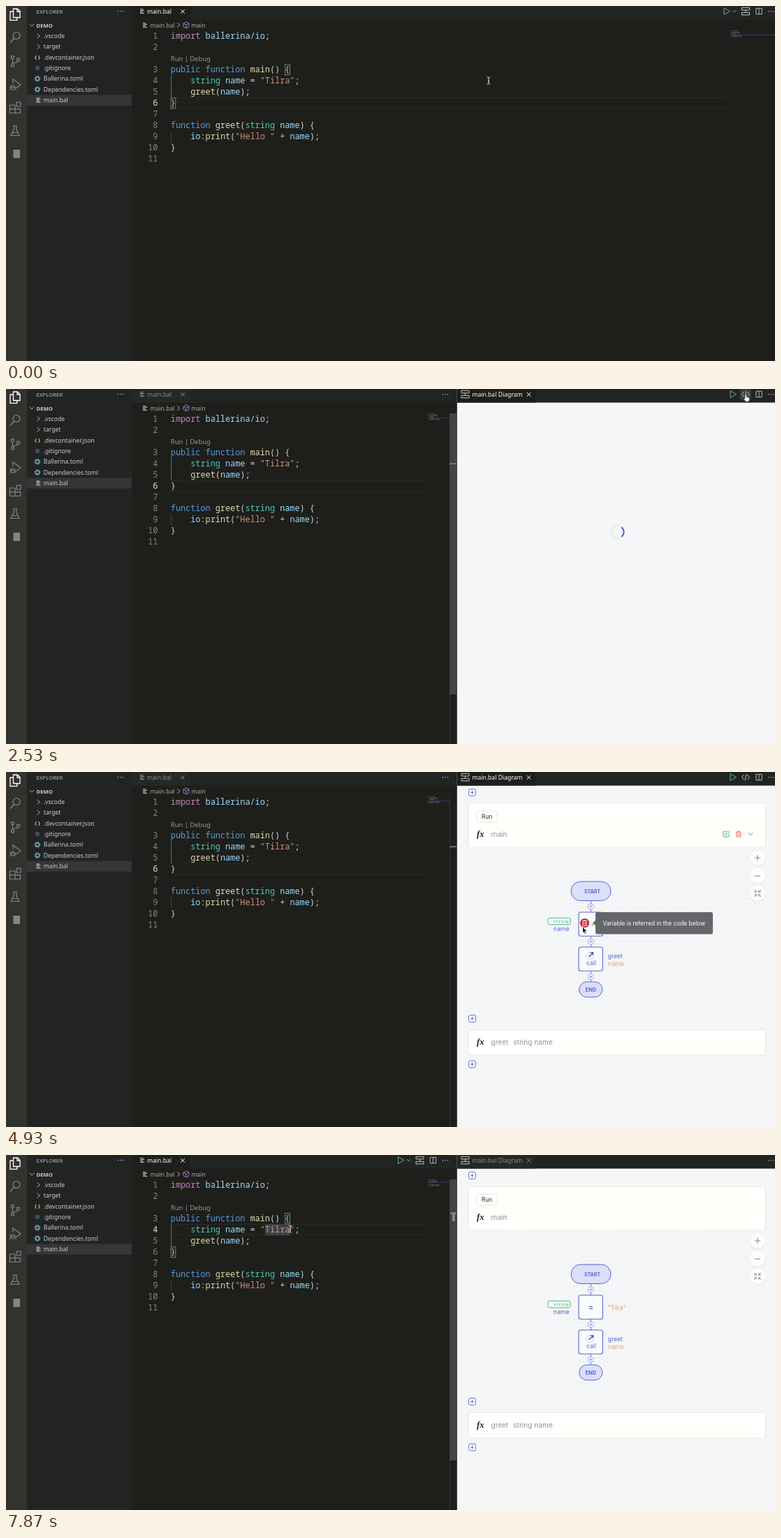
An HTML page that plays this animation: 1101 by 509 pixels, repeating every 8 s.

```html
<!DOCTYPE html>
<html lang="en">
<head>
<meta charset="utf-8">
<title>Editor and diagram</title>
<style>
html, body { margin: 0; width: 100%; height: 100%; overflow: hidden; background: #1e1e1b; }
svg { display: block; width: 100vw; height: 100vh; }
text { white-space: pre; font-family: "Noto Sans", "Open Sans", sans-serif; }
.mono { font-family: "Noto Sans Mono", "DejaVu Sans Mono", monospace; }
.geo { font-family: Inter, Roboto, sans-serif; }
.fx { font-family: "Liberation Serif", "Noto Serif", serif; font-style: italic; font-weight: bold; }
.bold { font-weight: 700; }
.end { text-anchor: end; }
.mid { text-anchor: middle; }
</style>
</head>
<body>
<svg id="stage" viewBox="0 0 1101 509" preserveAspectRatio="none"></svg>
<script>
const LOOP = 8000, STEP = 200 / 3;
const CHAR = 7.113, ROW = 16.05, LEFT = 235.8;
const BLUE = '#5567d5', GREY = '#c5c5c5', ORANGE = '#e2a468';

// Markup helpers
const rect = (x, y, w, h, fill, extra = '') =>
  `<rect x="${x}" y="${y}" width="${w}" height="${h}" fill="${fill}" ${extra}/>`;
const box = (x, y, w, h, r, fill, stroke, width = 1) =>
  rect(x, y, w, h, fill, `rx="${r}" stroke="${stroke}" stroke-width="${width}"`);
const circle = (x, y, r, fill, stroke = 'none', width = 1) =>
  `<circle cx="${x}" cy="${y}" r="${r}" fill="${fill}" stroke="${stroke}" stroke-width="${width}"/>`;
const line = (d, stroke, width = 1, fill = 'none') =>
  `<path d="${d}" fill="${fill}" stroke="${stroke}" stroke-width="${width}"/>`;
const text = (x, y, size, fill, str, cls = '') =>
  `<text x="${x}" y="${y}" font-size="${size}" fill="${fill}" class="${cls}">${str}</text>`;
const group = (id, ...parts) => `<g id="${id}">${parts.join('')}</g>`;
const at = (x, y, ...parts) => `<g transform="translate(${x} ${y})">${parts.join('')}</g>`;

// Small icons, centred on the given point
const play = x => at(x, 7.5, line('M-4-4.8L4.5 0L-4 4.8Z', '#5fb878', 1));
const chevronDown = (x, y, s = 2.3, c = GREY) => at(x, y, line(`M${-s} ${-s / 2}L0 ${s / 2}L${s} ${-s / 2}`, c, .9));
const chevronRight = (x, y) => at(x, y, line('M-1.8-3.3L1.8 0L-1.8 3.3', GREY, .9));
const diagram = x => at(x, 7.3, line('M-5.5-5H5.5V-1.5H-5.5ZM-5.5 2H5.5V5.5H-5.5ZM0-1.5V2', GREY, 1));
const codeIcon = x => at(x, 7.5, line('M-2.5-3.5L-5.5 0L-2.5 3.5M2.5-3.5L5.5 0L2.5 3.5M1-4.5L-1 4.5', GREY, 1));
const splitIcon = x => at(x, 7.5, line('M-4.2-4.2H4.2V4.2H-4.2ZM0-4.2V4.2', GREY, .9));
const dots = (x, y = 7.8) => [-3.5, 0, 3.5].map(d => circle(x + d, y, .75, GREY)).join('');
const close = (x, c) => at(x, 7.8, line('M-2.8-2.8L2.8 2.8M2.8-2.8L-2.8 2.8', c, 1));
const fileIcon = (x, y, c) => at(x, y, line('M-3-2.9H1.5M-3-1H3M-3 1H1M-3 2.9H3', c, 1));
const trash = (x, y, c) => at(x, y, line('M-3.6-2.8H3.6M-1.3-2.8V-4H1.3V-2.8M-2.8-2.8V4H2.8V-2.8M-1-.8V2.3M1-.8V2.3', c, .8));
const pen = (x, y, c) => at(x, y, line('M-3.8 1.6L1.6-3.8L3.4-2L-2 3.4L-4 3.6ZM.5 4H4.2', c, .8));
const cross = (x, y, r, c, w = 1) => line(`M${x - r} ${y}H${x + r}M${x} ${y - r}V${y + r}`, c, w);

// Source code: "~" separates tokens, the first letter picks the colour
const COLORS = { p: '#c586c0', b: '#569cd6', y: '#dcdcaa', t: '#4ec9b0', v: '#9cdcfe', s: '#ce9178', w: '#d4d4d4' };
const CODE = [
  'pimport ~vballerina/io~w;', '',
  'bpublic function ~ymain~w() {',
  'w    ~tstring ~vname ~w= ~s"Tilra"~w;',
  'w    ~ygreet~w(~vname~w);',
  'w}', '',
  'bfunction ~ygreet~w(~tstring ~vname~w) {',
  'w    ~vio~w:~yprint~w(~s"Hello " ~w+ ~vname~w);',
  'w}', ''];
const rowOf = n => n < 3 ? n - 1 : n;
const rowTop = n => 35 + ROW * rowOf(n);
const baseline = n => rowTop(n) + 11.6;
const tokens = s => s ? s.split('~').map(t => ({ color: COLORS[t[0]], str: t.slice(1) })) : [];
const lineNumber = (n, color) => text(217.4, baseline(n), 11.85, color, n, 'mono end');

function codeView() {
  return CODE.map((src, i) => lineNumber(i + 1, '#858580') + text(LEFT, baseline(i + 1), 11.85, COLORS.w,
    tokens(src).map(t => `<tspan fill="${t.color}">${t.str}</tspan>`).join(''), 'mono')).join('') +
    text(235.8, 79, 9.4, '#999994', 'Run | Debug') +
    rect(236, rowTop(4), 1, ROW * 2, '#6b6b68') + rect(236, rowTop(9), 1, ROW, '#404040');
}

function minimap(x, scale) {
  return CODE.map((src, i) => {
    let col = 0;
    return tokens(src).map(t => {
      const bar = t.str.trim() ? rect(x + col * scale, 35 + i * 1.07, t.str.trimEnd().length * scale, .7, t.color, 'opacity=".45"') : '';
      col += t.str.length;
      return bar;
    }).join('');
  }).join('');
}

const lineFrame = (n, right) => rect(236, rowTop(n), right - 236, 1, '#2b2b29') + rect(236, rowTop(n) + ROW - 1, right - 236, 1, '#2b2b29');
const bracket = (col, n) => box(LEFT + col * CHAR + .3, rowTop(n) + .5, CHAR - .4, ROW - 1, 0, '#00640022', '#888884', .9);
const caret = (id, x, n) => group(id, rect(x, rowTop(n), 1, ROW, '#aeafad'));

function sidebar() {
  const files = ['.vscode', 'target', '.devcontainer.json', '.gitignore', 'Ballerina.toml', 'Dependencies.toml', 'main.bal'];
  const rowY = i => 42.8 + i * 15.35;
  const gear = y => circle(45, y, 2.6, 'none', '#6d9fb0', 1.8) +
    `<circle cx="45" cy="${y}" r="4" fill="none" stroke="#6d9fb0" stroke-width="1" stroke-dasharray="1.5 1.64"/>`;
  return rect(30, 0, 150, 509, '#222424') + rect(30, 127.5, 150, 15.2, '#35363a') +
    text(43.6, 10.6, 7.8, '#bbbbb8', 'EXPLORER') + dots(164, 7.5) +
    chevronDown(37, 27.5, 3.2) + text(43.6, 30.6, 7.7, '#cccccc', 'DEMO', 'bold') +
    files.map((f, i) => text(53.8, rowY(i) + 3.2, 8.6, '#cccccc', f)).join('') +
    chevronRight(46.5, rowY(0)) + chevronRight(46.5, rowY(1)) +
    text(41, rowY(2) + 2.6, 7.5, '#cbcb41', '{ }', 'bold') +
    rect(42.2, rowY(3) - 2.8, 5.6, 5.6, '#41535b') +
    gear(rowY(4)) + gear(rowY(5)) + fileIcon(46.5, rowY(6), '#d4d7d6');
}

function activityBar() {
  const c = '#858580';
  return rect(0, 0, 30, 509, '#32322f') +
    at(13, 12, line('M-2.5-8H3.5L7-4.5V4.5H-2.5ZM3-8V-4H7M-2.5-4H-7V8.3H2.8V4.5', '#ffffff', 1.3)) +
    at(13, 45, circle(2, -2.5, 5, 'none', c, 1.2), line('M-1.5 1.2L-7 7.5', c, 1.3)) +
    at(13, 79, circle(-3.5, -5.5, 2.1, 'none', c, 1.2), circle(-3.5, 6, 2.1, 'none', c, 1.2), circle(4.5, -2, 2.1, 'none', c, 1.2),
      line('M-3.5-3.4V3.9M4.5 .1C4.5 3-3.5 1-3.5 4', c, 1.2)) +
    at(13, 113, line('M-3-2V-8L8 0L1 5', c, 1.2), circle(-3, 4, 3, 'none', c, 1.2), line('M-8 1L-6 2.5M-8 4.5H-6M-8 8L-6 6.5M2 8L0 6.5M-6 3.5H0', c, 1)) +
    at(13, 146, line('M-7.5-4H0V7.5H-7.5ZM-7.5 1.7H7.5V7.5H0M2.3-7.8H8V-2H2.3Z', c, 1.2)) +
    at(13, 179, line('M-3-7H3M-1.8-7V-2L-6 6.5H6L1.8-2V-7M-4 2.5H4', c, 1.2)) +
    rect(10.5, 206, 9.5, 12, c);
}

function mainTab(active) {
  const c = active ? '#ffffff' : '#8d8d8a';
  return rect(180, 0, 83.5, 19.5, active ? '#1e1e1b' : '#262827') + fileIcon(195, 7.5, active ? '#d4d7d6' : '#9a9c9b') +
    text(202, 10.8, 8.6, c, 'main.bal') + close(253, c);
}
function diagramTab(active) {
  const c = active ? '#ffffff' : '#8d8d8a';
  return rect(646, 0, 112, 19.5, active ? '#1e1e1b' : '#262827') + diagram(657.5) +
    text(667.4, 10.8, 8.6, c, 'main.bal Diagram') + close(748.5, c);
}
const editorTools = x => play(x) + chevronDown(x + 11, 7.5) + diagram(x + 27) + splitIcon(x + 46);

// Diagram panel
const card = (y, h) => box(662, y, 425.5, h, 2, '#fffffc', '#e6e7ea', 1);
const addButton = y => box(662.5, y - 5, 10, 10, 2.5, '#f8f9ff', BLUE, .9) + cross(667.5, y, 2.5, BLUE, .9);
const pill = (x, y, w, h) => box(x, y, w, h, h / 2, '#dbdff8', BLUE, 1);
const addNode = y => circle(837.3, y, 4, '#f6f7fb', '#8f9be0', .8) + cross(837.3, y, 1.6, BLUE, .7);
const nodeBox = y => box(820, y, 34.3, 34.3, 3, '#fbfbfd', BLUE, 1.1);
const zoomButton = y => circle(1076, y + .8, 11.5, '#e6e8ea') + circle(1076, y, 11, '#fdfdfd');

function flow() {
  return addButton(29.3) + card(45, 63) + box(673.5, 56, 30, 16, 2, '#fffffc', '#e2e3e8', .9) +
    text(688.5, 67, 8.4, '#222228', 'Run', 'geo mid') +
    text(674, 92.5, 12.5, '#1d2028', 'fx', 'fx') + text(694.6, 93, 10.1, '#8d91a0', 'main', 'geo') +
    rect(662, 108, 425.5, 232.5, '#f5f6f7') + rect(662, 108, 425.5, 232.5, 'url(#grid)') +
    zoomButton(123) + cross(1076, 123, 4, '#8a8c94', 1.1) +
    zoomButton(149) + line('M1072 149H1080', '#8a8c94', 1.1) + zoomButton(174) +
    at(1076, 174, line('M-5-5L-1.8-1.8V-4.5M-1.8-1.8H-4.5M5-5L1.8-1.8V-4.5M1.8-1.8H4.5M-5 5L-1.8 1.8V4.5M-1.8 1.8H-4.5M5 5L1.8 1.8V4.5M1.8 1.8H4.5', '#7b7e88', .9)) +
    line('M837.3 185V301', BLUE, .9) +
    pill(809, 157, 57, 27.5) + text(839.5, 174, 7, BLUE, 'START', 'geo bold mid') +
    nodeBox(201) + nodeBox(251) + addNode(193) + addNode(243) + addNode(293.5) +
    pill(820.7, 300.8, 33.2, 22) + text(837.3, 314.6, 7.4, BLUE, 'END', 'geo bold mid') +
    box(775.8, 209.3, 32.4, 9.6, 2.5, '#f4fbf7', '#36b475', .9) + text(783.6, 216.2, 6.1, '#36b475', 'string', 'mono') +
    text(806.5, 228, 8.7, BLUE, 'name', 'geo end') +
    at(836, 263.5, line('M1-5A5 5 0 1 0 5 1', '#c3c9f0', .9), line('M-1.5 1.5L4.5-4.5M.8-4.6H4.6V-.8', '#2f3f9f', 1.1)) +
    text(838, 277, 8.6, BLUE, 'call', 'geo mid') +
    text(861.8, 266.5, 8.5, BLUE, 'greet', 'geo') + text(861.8, 278.2, 8.7, ORANGE, 'name', 'geo') +
    addButton(353.5) + card(369.5, 36.5) + text(674, 390.5, 12.5, '#1d2028', 'fx', 'fx') +
    text(694.6, 391, 9.9, '#8d91a0', 'greet', 'geo') + text(726.3, 391, 10.1, '#8d91a0', 'string name', 'geo') + addButton(419);
}

document.getElementById('stage').innerHTML = `
  <defs><pattern id="grid" x="662" y="108" width="6" height="6" patternUnits="userSpaceOnUse">${circle(2, 2, .55, '#cfd2da')}</pattern></defs>` +
  rect(0, 0, 1101, 509, '#1e1e1b') + activityBar() + sidebar() +
  rect(180, 0, 921, 19.5, '#222424') +
  group('wide', lineFrame(6, 1033), minimap(1037, .55), rect(1037, 40.8, 64, 1, '#2b4170')) +
  group('split', minimap(604, .55), rect(635, 35, 1, 474, '#353533'), rect(645, 0, 1, 509, '#444442')) +
  group('lineSix', lineFrame(6, 601), rect(604, 40.8, 31, 1, '#2b4170')) +
  group('lineFour', lineFrame(4, 601), rect(604, 38.6, 31, 1, '#2b4170')) +
  group('selection', rect(LEFT + 19 * CHAR, rowTop(4), 5 * CHAR, ROW, '#3d424c')) +
  codeView() + group('numberSix', lineNumber(6, '#c6c6c6')) + group('numberFour', lineNumber(4, '#c6c6c6')) +
  group('brackets', bracket(23, 3), bracket(0, 6)) + caret('caretSix', 243, 6) + caret('caretFour', 407, 4) +
  fileIcon(199, 27.5, '#d4d7d6') + text(206.5, 30.8, 8.6, '#a9a9a6', 'main.bal') + chevronRight(247, 27.5) +
  at(258, 27.3, line('M0-4.5L4-2.3V2.3L0 4.5L-4 2.3V-2.3ZM-4-2.3L0 0L4-2.3M0 0V4.5', '#b180d7', .9)) +
  text(265.2, 30.8, 8.6, '#a9a9a6', 'main') +
  group('slider', rect(635, 35, 10, 403, '#434341')) +
  group('mark', rect(635, 106.5, 10, 1.2, '#9a9a97')) +
  group('markSelected', rect(636, 82.5, 9, 2, '#8b8b88'), rect(639, 82.5, 3.5, 12.5, '#8b8b88')) +
  group('panel', rect(646, 19.5, 455, 489.5, '#f4f6f7'),
    group('spinner', circle(0, 0, 9, 'none', '#e4e7f2', 1.4), line('M5.8-6.9A9 9 0 0 1 5.8 6.9', BLUE, 2)),
    group('flow', flow(),
      group('cardTools', at(1031, 89, line('M1-4H-4V4H4V-.5', '#36b475', .9), line('M-1.5 1.5L-1-.8L3-4.8L4.8-3L.8 1Z', '#36b475', .8)),
        trash(1048.7, 89, '#d9534f'), chevronDown(1066, 89, 3.3, '#6b6e7a')),
      group('equals', text(837.3, 221.6, 10, BLUE, '=', 'geo bold mid')),
      group('nodeTools', circle(828.5, 216.5, 6.6, '#c2283d'), trash(828.5, 216.5, '#ffffff'), pen(843, 216.5, '#36b475')),
      group('value', text(861.8, 222, 8.6, ORANGE, '"Tilra"', 'geo')),
      group('valueMono', text(861.8, 222, 8.8, ORANGE, '"Tilra"', 'mono')),
      group('tooltip', line('M840 216.5L845 212V221Z', 'none', 0, '#65666a'), rect(844, 201, 168, 31.5, '#65666a', 'rx="2.5"'),
        text(854.6, 220, 8.3, '#ffffff', 'Variable is referred in the code below', 'geo')))) +
  group('hover', rect(1051, 0, 16, 15.5, '#3c3e40', 'rx="2.5"')) +
  group('wideTop', mainTab(true), editorTools(1032), dots(1095.5)) +
  group('rightTop', mainTab(false), diagramTab(true), dots(629), play(1041), codeIcon(1059), splitIcon(1078), dots(1095.5)) +
  group('leftTop', mainTab(true), diagramTab(false), editorTools(565.5), dots(629), dots(1095.5)) +
  group('ibeam', line('M-2.3-5C-1-5 0-4.6 0-4C0-4.6 1-5 2.3-5M0-4V4M-2.3 5C-1 5 0 4.6 0 4C0 4.6 1 5 2.3 5M-1 .5H1', '#e8e8e8', 1)) +
  group('arrow', line('M0 0V9L2.1 7.1L3.6 10.6L5.2 9.9L3.7 6.5H6.5Z', '#ffffff', .7, '#111111')) +
  group('hand', line('M0 0C1 0 1.2 .6 1.2 1.4V4L4.5 4.8C5.4 5 5.6 5.6 5.5 6.4L4.8 10.5H-.2L-2.6 6.8C-2.6 5.8-1.6 5.8-1 6.4V1.2C-1 .5-.7 0 0 0Z', '#222222', .6, '#ffffff'));

// Pointer moves: start, end, x, y
const MOVES = [
  [0, 0, 691, 107], [133, 200, 837, 88], [400, 533, 894, 73], [600, 667, 939, 59], [800, 1333, 1054, 6],
  [1400, 1533, 1056, 11], [1600, 1800, 1059, 7.5], [2600, 3000, 1000, 150], [3400, 3733, 930, 240],
  [3800, 4133, 880, 232], [4267, 4333, 838, 226], [4600, 4667, 825, 223], [4800, 5067, 826, 221],
  [5600, 5733, 773, 219], [5733, 5933, 468, 180], [6067, 6133, 317, 161], [6200, 6333, 325, 125],
  [6400, 6467, 384, 108], [6733, 6800, 407, 106]];

function pointer(t) {
  let x = 0, y = 0;
  for (const [start, end, toX, toY] of MOVES) {
    if (t < start) break;
    const k = end > start ? Math.min(1, (t - start) / (end - start)) : 1;
    x += (toX - x) * k;
    y += (toY - y) * k;
  }
  return [x, y];
}

const el = id => document.getElementById(id);
const show = (id, on) => el(id).setAttribute('opacity', +on);

function draw(ms) {
  const t = Math.floor((ms % LOOP + 5) / STEP) * STEP + .01;
  const within = (a, b) => t >= a && t < b;
  const split = t >= 2000, editing = t >= 7390;

  show('wide', !split); show('split', split);
  show('wideTop', !split); show('rightTop', split && !editing); show('leftTop', editing);
  show('lineSix', split && !editing); show('lineFour', editing);
  show('numberSix', !editing); show('numberFour', editing);
  show('brackets', !split || editing);
  show('caretSix', within(460, 990) || within(1460, 1990));
  show('caretFour', within(7390, 7860));
  show('selection', t >= 7660); show('markSelected', t >= 7660);
  show('mark', split && !editing);
  const fade = t < 5860 ? Math.max(0, Math.min(1, (3270 - t) / 500)) : 1;
  show('slider', split ? fade : 0);

  show('panel', t >= 2530);
  show('spinner', t < 2990);
  el('spinner').setAttribute('transform', `translate(875.5 205) rotate(${(t - 2533) * .36})`);
  show('flow', t >= 3460);
  show('cardTools', t < 5860);
  const tools = within(4330, 5730), tip = within(4860, 5790), mono = within(4660, 5790);
  show('nodeTools', tools); show('equals', !tools);
  show('value', !mono); show('valueMono', mono && !tip); show('tooltip', tip);

  const [x, y] = pointer(t), hover = within(1460, 2650);
  show('hover', hover);
  const kind = hover ? 'hand' : (split && x > 645) || y < 20 ? 'arrow' : 'ibeam';
  for (const id of ['ibeam', 'arrow', 'hand']) show(id, id === kind);
  el(kind).setAttribute('transform', `translate(${x} ${y})`);
}

const begin = performance.now();
function tick() {
  draw(performance.now() - begin);
  requestAnimationFrame(tick);
}
tick();
</script>
</body>
</html>
```
